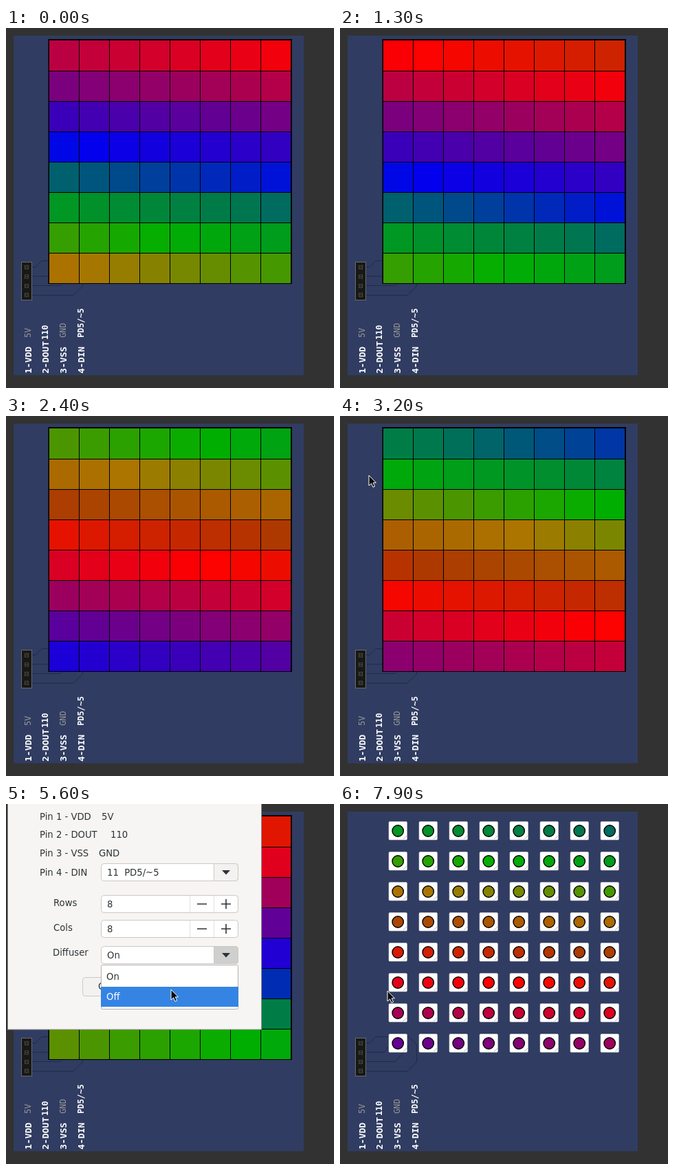
Write an HTML page that moves like this. It is 477 px wide and 522 px high and loops after 8 s.

```html
<!DOCTYPE html>
<html lang="en">
<head>
<meta charset="utf-8">
<title>LED matrix</title>
<style>
html, body { margin: 0; width: 100%; height: 100%; overflow: hidden; background: #323232; }
svg { display: block; }
text { font-family: "DejaVu Sans", sans-serif; font-size: 13.2px; fill: #2e3436; white-space: pre; }
#pins text { font: bold 13px "DejaVu Sans Mono", monospace; fill: #fff; }
#pins .val { font-size: 11.8px; }
#pins .dim { font-weight: normal; fill: #999; }
.wire { fill: none; stroke: #212a46; }
.field { fill: #fff; stroke: #cdc7c2; }
.btn { fill: #f3f2f1; stroke: #cdc7c2; }
.sign { stroke: #2e3436; stroke-width: 1.6; }
.thin { stroke: #e4e1de; }
</style>
</head>
<body>
<svg width="477" height="522" viewBox="0 0 477 522">
  <rect width="477" height="522" fill="#323232"/>
  <rect x="11" y="11" width="422" height="492.5" fill="#303c61"/>

  <path class="wire" d="M38 346.500H43L52 337.500H100L111.500 349V374L98 387.500H38M38 360H64L68.500 356V353H72M38 373.500H80L98.500 355V350"/>
  <rect x="22.500" y="339.500" width="15" height="55" fill="#181818" stroke="#6b6b6b"/>
  <g id="header" fill="none" stroke="#4a4838"></g>
  <g id="pins"></g>

  <g id="diffused"><rect x="61.500" y="16" width="354.500" height="355"/></g>
  <g id="bare"></g>

  <g id="dialog">
    <rect x="2.500" y="-5" width="369" height="332" fill="#f6f5f4" stroke="#8b8b8b"/>
    <g id="labels"></g>
    <g id="fields"></g>
    <rect class="btn" x="111.500" y="251.500" width="64" height="27" rx="4"/>
    <text x="134" y="269">Ok</text>
    <rect class="btn" x="196.500" y="250.500" width="64" height="27" rx="4"/>
    <text x="205.500" y="268">Cancel</text>
    <g id="popup">
      <rect x="138.500" y="233.500" width="199" height="64" rx="2" fill="#fff" stroke="#b5b1ad"/>
      <rect id="mark" x="138" width="200" height="29" fill="#3584e4"/>
      <text id="itemOn" x="146" y="255">On</text>
      <text id="itemOff" x="146" y="284">Off</text>
    </g>
  </g>
  <path id="cursor" d="M0 0V15L3.600 11.800L6 17.200L8.600 16L6.200 10.800H10.500Z" fill="#0a0a0a" stroke="#fff"/>
</svg>
<script>
const $ = id => document.getElementById(id);

function add(parent, tag, attrs, content = '') {
  const node = document.createElementNS('http://www.w3.org/2000/svg', tag);
  for (const key in attrs) node.setAttribute(key, attrs[key]);
  node.textContent = content;
  return $(parent).appendChild(node);
}

// Connector and its vertical labels
[347, 360.5, 374, 387].forEach(y => {
  add('header', 'rect', { x: 27.5, y: y - 2.5, width: 5, height: 5 });
  add('header', 'path', { d: `M28 ${y}h4` });
});
[['1-VDD', '5V', 449, 'dim'], ['2-DOUT', '110', 452, ''],
 ['3-VSS', 'GND', 449, 'dim'], ['4-DIN', 'PD5/~5', 449, '']].forEach(([pin, val, y, style], i) => {
  const x = [36.5, 62, 87.5, 113.5][i];
  add('pins', 'text', { transform: `translate(${x} 501) rotate(-90)` }, pin);
  add('pins', 'text', { class: 'val ' + style, transform: `translate(${x - 1} ${y}) rotate(-90)` }, val);
});

// Both looks of the 8 x 8 matrix; the hue order runs right to left, top to bottom
const leds = [];
for (let row = 0; row < 8; row++) for (let col = 7; col >= 0; col--) {
  const x = 44 * col, y = 44 * row;
  const cell = add('diffused', 'rect', { x: 63 + x, y: row ? 19 + y : 18, width: 43, height: row ? 43 : 44 });
  add('bare', 'rect', { x: 71 + x, y: 25.5 + y, width: 26.5, height: 26.5, rx: 1.5, fill: '#fff', stroke: '#c9cbd2', 'stroke-width': .6 });
  add('bare', 'path', { d: `M${92 + x} ${51 + y}l5 -5`, stroke: '#aaa', 'stroke-width': .8 });
  const dot = add('bare', 'circle', { cx: 84.2 + x, cy: 39 + y, r: 8.2, stroke: '#000', 'stroke-width': 1.4 });
  leds.push([cell, dot]);
}

// Dialog
[['Pin 1 - VDD', 49, 23], ['5V', 139, 23], ['Pin 2 - DOUT', 49, 49], ['110', 152, 49],
 ['Pin 3 - VSS', 49, 76], ['GND', 135, 76], ['Pin 4 - DIN', 49, 104],
 ['Rows', 69, 148], ['Cols', 69, 184], ['Diffuser', 68, 220]]
  .forEach(([s, x, y]) => add('labels', 'text', { x, y }, s));

function field(y, value) {
  add('fields', 'rect', { class: 'field', x: 138.5, y: y + .5, width: 199, height: 25, rx: 4 });
  return add('fields', 'text', { x: 147, y: y + 17.5 }, value);
}
function combo(y, value) {
  const label = field(y, value);
  const button = add('fields', 'path', { class: 'btn', d: `M302.5 ${y + .5}h31q4 0 4 4v17q0 4 -4 4h-31z` });
  add('fields', 'path', { d: `M314 ${y + 10}h12l-6 6.500z`, fill: '#2e3436' });
  return [label, button];
}
function spin(y, value) {
  field(y, value);
  add('fields', 'path', { class: 'thin', d: `M267.5 ${y + 1}v24M302.5 ${y + 1}v24` });
  add('fields', 'path', { class: 'sign', d: `M278 ${y + 13}h14M313 ${y + 13}h14M320 ${y + 6}v14` });
}
combo(86, '11  PD5/~5');
spin(132, '8');
spin(168, '8');
const [choice, arrow] = combo(206, 'On');

// Rainbow with eight equal sections, then strip colour correction
const rainbow = [[255, 0, 0], [171, 85, 0], [171, 170, 0], [0, 255, 0],
                 [0, 171, 85], [0, 0, 255], [85, 0, 171], [171, 0, 85]];
const gain = [1, .69, .94];
function colour(hue) {
  const h = ((hue % 256) + 256) % 256 / 32, i = Math.floor(h), next = rainbow[(i + 1) % 8];
  return `rgb(${rainbow[i].map((v, c) => Math.round((v + (next[c] - v) * (h - i)) * gain[c]))})`;
}

// Piecewise linear track: [time, ...values]
function track(keys, t) {
  const i = keys.findIndex(k => k[0] > t);
  if (i < 0) return keys[keys.length - 1].slice(1);
  if (!i) return keys[0].slice(1);
  const a = keys[i - 1], b = keys[i], f = (t - a[0]) / (b[0] - a[0]);
  return a.slice(1).map((v, j) => v + (b[j + 1] - v) * f);
}
const hues = [[0, 251], [199, 251], [200, 191.5], [800, 237], [1800, 313], [2400, 358.5],
              [4100, 448], [5600, 524], [7900, 643]];
const pointer = [[2700, 48, 88], [3000, 62, 92], [3200, 42, 86], [3500, 48, 92], [4000, 104, 137], [4200, 104, 137],
                 [4900, 318, 214], [5200, 318, 216], [5600, 240, 269], [5800, 240, 269], [6200, 143, 263],
                 [6300, 143, 263], [6600, 60, 432], [6800, 26, 420], [7000, 84, 292], [7300, 69, 271]];
const holds = [1, 25, 26, 31, 34, 38, 39, 42, 50, 57, 71];

const show = (id, on) => $(id).style.display = on ? '' : 'none';

function draw(now) {
  let step = Math.floor(now % 8000 / 100);
  while (holds.includes(step)) step--;
  const t = step * 100;

  const hue = Math.round(track(hues, t)[0]), bare = t >= 6300;
  leds.forEach(([cell, dot], n) => (bare ? dot : cell).setAttribute('fill', colour(hue - 3 * n)));
  show('bare', bare);
  show('diffused', !bare);

  const [x, y] = track(pointer, t);
  $('cursor').setAttribute('transform', `translate(${x} ${y})`);
  show('cursor', t >= 2700);

  const open = t >= 5100 && t < 5800, onOff = y >= 265;
  show('dialog', t >= 4000 && t < 6300);
  show('popup', open);
  $('mark').setAttribute('y', onOff ? 265 : 236);
  $('itemOn').style.fill = onOff ? '' : '#fff';
  $('itemOff').style.fill = onOff ? '#fff' : '';
  arrow.style.fill = open ? '#cfcfcf' : '';
  choice.textContent = t >= 5800 ? 'Off' : 'On';
}

let start;
function tick(now) {
  start ??= now;
  draw(now - start);
  requestAnimationFrame(tick);
}
draw(0);
requestAnimationFrame(tick);
</script>
</body>
</html>
```
